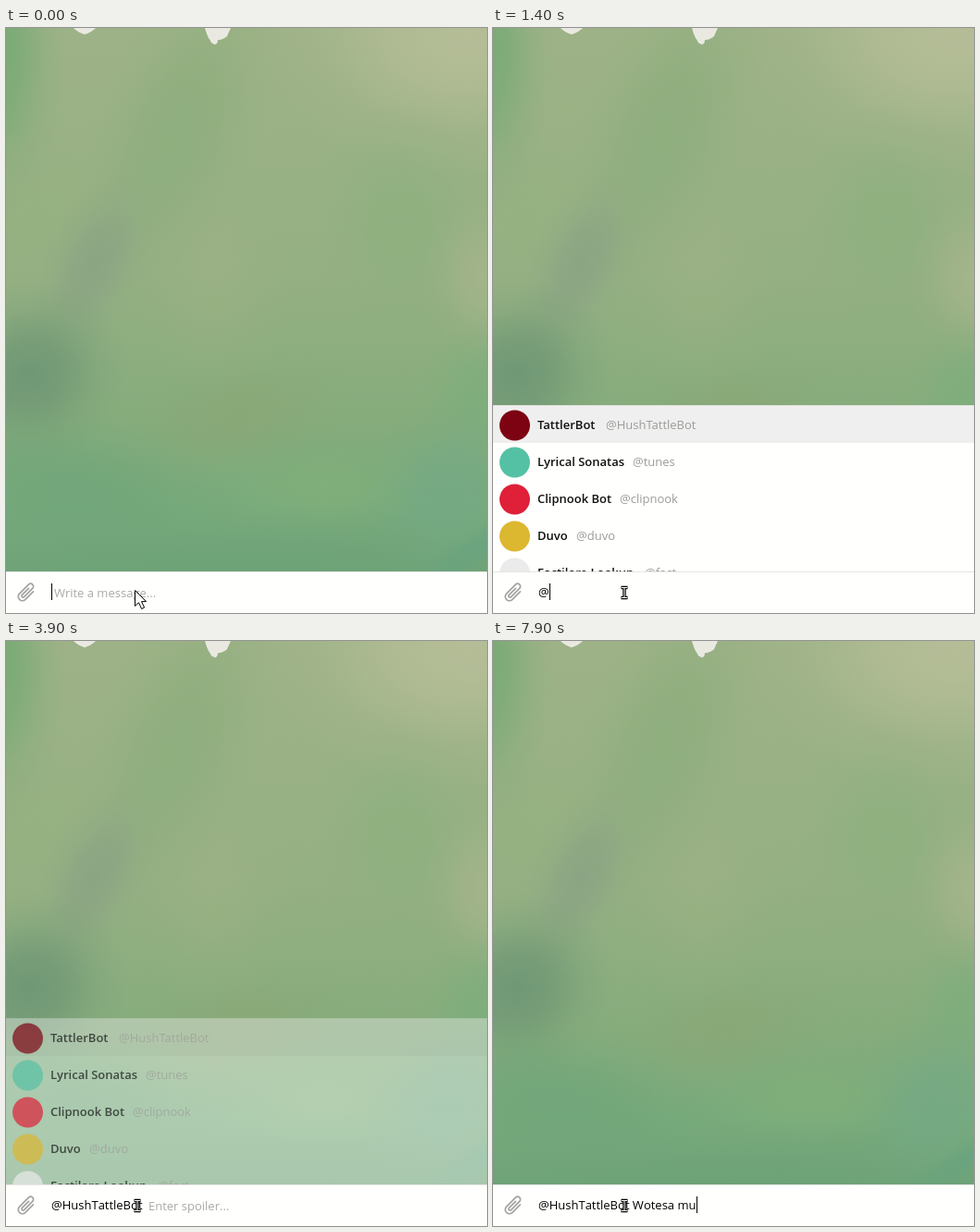
An HTML page for the animation above (8000 ms loop, 520 by 633 pixels).

```html
<!DOCTYPE html>
<html lang="en">
<head>
<meta charset="utf-8">
<title>Message field</title>
<style>
  html, body { margin: 0; width: 100%; height: 100%; overflow: hidden; background: #fffffe; }
  svg { display: block; width: 520px; height: 633px; }
  text { font: 13px "Open Sans", "Noto Sans", sans-serif; }
  .name { font-weight: 600; fill: #111; }
  .handle { fill: #9b9b97; }
  #hint { fill: #a9a9a9; }
  #typed { fill: #000; font-kerning: none; white-space: pre; }
</style>
</head>
<body>
<svg id="stage" viewBox="0 0 520 633">
  <defs id="defs">
    <clipPath id="wall"><rect width="520" height="588"/></clipPath>
    <linearGradient id="base" x1="0" y1="0" x2="0" y2="1">
      <stop offset="0" stop-color="#9db286"/>
      <stop offset=".45" stop-color="#95b083"/>
      <stop offset=".72" stop-color="#86ac7c"/>
      <stop offset=".88" stop-color="#78aa7b"/>
      <stop offset="1" stop-color="#6fa278"/>
    </linearGradient>
  </defs>
  <g clip-path="url(#wall)">
    <rect width="520" height="588" fill="url(#base)"/>
    <g id="blobs"></g>
    <g fill="#e9e9e2">
      <path d="M73 0Q78 5 85 7Q92 5 97 0Z"/>
      <path d="M215 0Q217 7 219 11Q221 13 222 16L226 18Q229 17 229 13Q234 13 239 9Q241 4 243 0Z"/>
    </g>
    <g id="panel">
      <g id="sheet">
        <rect y="408" width="520" height="1" fill="#dfe2dc"/>
        <rect y="409" width="520" height="180" fill="#fffffd"/>
        <rect y="409" width="520" height="40" fill="#f0efef"/>
      </g>
      <g id="rows"></g>
    </g>
  </g>
  <rect y="588" width="520" height="45" fill="#fffffd"/>
  <rect y="588" width="520" height="1" fill="#e6e7e4"/>
  <path transform="translate(22 611) rotate(45)" fill="none" stroke="#a3a3a1" stroke-width="1.7" stroke-linecap="round"
    d="M4.5 -6V6a4.5 4.5 0 0 1 -9 0V-8a3 3 0 0 1 6 0V5a1.5 1.5 0 0 1 -3 0V-5"/>
  <text id="hint" y="616"></text>
  <text id="typed" x="49" y="615" xml:space="preserve"></text>
  <rect id="caret" y="601" width="1" height="18" fill="#000"/>
  <path id="arrow" d="M139.5 608.5V625.5L143.5 621.8L146.6 628.5L149.6 627.1L146.5 620.6H151.5Z" fill="#fff" stroke="#000"/>
  <g id="beam" fill="none">
    <path d="M138.5 605.5H145.5M138.5 616.5H145.5M142 605V617" stroke="#000" stroke-width="3.4"/>
    <path d="M139 605.5H145M139 616.5H145M142 605V617" stroke="#fff" stroke-width="1"/>
  </g>
</svg>
<script>
const NS = 'http://www.w3.org/2000/svg';
const $ = id => document.getElementById(id);

function add(parent, tag, attrs, text) {
  const el = document.createElementNS(NS, tag);
  for (const k in attrs) el.setAttribute(k, attrs[k]);
  if (text) el.textContent = text;
  parent.appendChild(el);
  return el;
}

// Soft backdrop patches: centre, radii, tilt, colour, strength
const patches = [
  [500, 10, 230, 150, 0, '#b9bf9a', .85],
  [-10, 20, 75, 190, 0, '#6fa872', .8],
  [185, 110, 90, 200, 20, '#87ac7a', .6],
  [30, 210, 90, 110, 30, '#94b080', .6],
  [95, 255, 55, 110, 25, '#869e84', .65],
  [25, 375, 110, 100, -30, '#6d9574', .9],
  [225, 270, 90, 130, 0, '#9cb184', .55],
  [250, 420, 130, 70, -15, '#8ba777', .7],
  [425, 210, 100, 130, 0, '#8bb07e', .6],
  [525, 270, 75, 90, 0, '#a8b68c', .8],
  [515, 395, 75, 75, 0, '#7bae7b', .7],
  [70, 500, 190, 90, 10, '#6fa57a', .75],
  [345, 495, 120, 50, 0, '#82b07a', .8],
  [480, 500, 90, 110, 30, '#74a985', .8],
  [515, 560, 110, 22, -32, '#66a380', .7],
  [250, 590, 320, 55, 0, '#6da277', .7]
];
patches.forEach(([x, y, rx, ry, turn, color, strength], i) => {
  const grad = add($('defs'), 'radialGradient', { id: 'soft' + i });
  [[0, 1], [.35, .75], [.7, .22], [1, 0]].forEach(([offset, a]) =>
    add(grad, 'stop', { offset, 'stop-color': color, 'stop-opacity': a * strength }));
  add($('blobs'), 'ellipse', {
    rx, ry, fill: `url(#soft${i})`, transform: `translate(${x} ${y}) rotate(${turn})`
  });
});

const bots = [
  ['TattlerBot', '@HushTattleBot', 122, '#7d0312'],
  ['Lyrical Sonatas', '@tunes', 151, '#55c1a4'],
  ['Clipnook Bot', '@clipnook', 137, '#df2038'],
  ['Duvo', '@duvo', 90, '#dcb730'],
  ['Factilore Lookup', '@fact', 164, '#ebebeb']
];
bots.forEach(([name, handle, x, color], i) => {
  const y = 430 + i * 40;
  add($('rows'), 'circle', { cx: 23.5, cy: y, r: 16.5, fill: color });
  add($('rows'), 'text', { x: 48, y: y + 4, class: 'name' }, name);
  add($('rows'), 'text', { x, y: y + 4, class: 'handle' }, handle);
});

// Times below are in ticks of 100 ms
const message = '@HushTattleBot Wotesa mu';
const keys = [[11, 1], [36, 15], [61, 16], [66, 17], [70, 18], [71, 19],
              [73, 20], [75, 21], [76, 22], [77, 23], [79, 24]];
const caretOff = [[1, 6], [16, 21], [26, 31], [36, 41], [46, 51], [56, 61], [65, 66]];

const clamp = v => Math.max(0, Math.min(1, v));

function panelAlpha(n) {
  return n < 36 ? clamp((n - 11) / 3) ** 1.6 : clamp((41 - n) / 5);
}

function hintState(n) {
  if (n < 36) {
    const k = Math.max(0, n - 10);
    return ['Write a message...', 52 + 9 * k, clamp(1 - (k / 4) ** 2)];
  }
  return ['Enter spoiler...', 154, n < 61 ? clamp((n - 35) / 4) : clamp((63 - n) / 3)];
}

function draw(n) {
  const alpha = panelAlpha(n);
  $('panel').style.display = alpha ? '' : 'none';
  $('sheet').style.opacity = alpha;
  $('rows').style.opacity = alpha ** .4;

  let count = 0;
  for (const [at, len] of keys) if (n >= at) count = len;
  $('typed').textContent = message.slice(0, count);
  const width = count ? $('typed').getComputedTextLength() : 0;
  $('caret').setAttribute('x', Math.round(49 + width));
  $('caret').style.display = caretOff.some(([a, b]) => n >= a && n < b) ? 'none' : '';

  const [text, x, a] = hintState(n);
  $('hint').textContent = text;
  $('hint').setAttribute('x', x);
  $('hint').style.opacity = a;

  $('arrow').style.display = n < 1 ? '' : 'none';
  $('beam').style.display = n < 1 ? 'none' : '';
}

const start = performance.now();
let last = -1;
function tick() {
  const n = Math.floor(((performance.now() - start) % 8000) / 100);
  if (n !== last) draw(last = n);
  requestAnimationFrame(tick);
}
tick();
</script>
</body>
</html>
```
